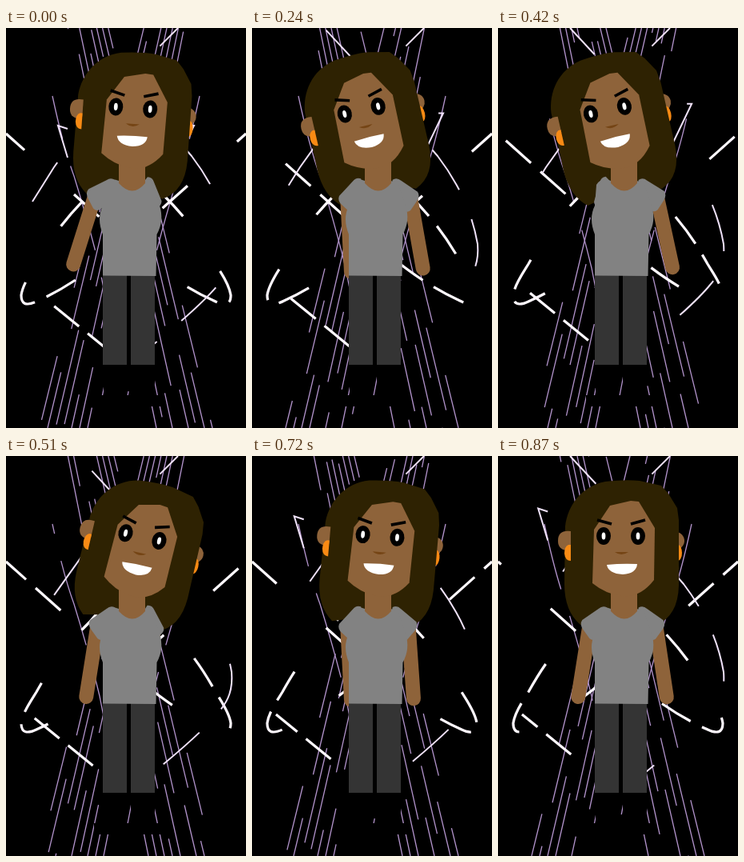
Write an HTML page that moves like this. It is 300 by 500 pixels and loops after 0.9 s.

```html
<!DOCTYPE html>
<html lang="en">
<head>
<meta charset="utf-8">
<title>Dancer</title>
<style>
html, body { margin: 0; width: 100%; height: 100%; overflow: hidden; background: #000; }
svg { display: block; width: 100vw; height: 100vh; }
.beam { fill: none; stroke: #fff8ff; stroke-width: 3.2; }
.thin { fill: none; stroke: #f0e2fa; stroke-width: 2; }
.ray { fill: none; stroke: #b394cc; stroke-width: 1.3; }
.skin { fill: #8e633a; }
.hair { fill: #2e2202; }
.shirt { fill: #828282; }
.gold { fill: #f88a14; }
.arm { stroke: #8e633a; stroke-width: 18; stroke-linecap: round; }
</style>
</head>
<body>
<svg viewBox="0 0 300 500" preserveAspectRatio="none">
  <defs>
    <path id="sleeve" class="shirt" d="M6-2Q0-4-4 2L-20 21Q-22 27-16 32L-5 41Q0 43 3 39L14 20Z"/>
    <path id="limb" class="arm" d="M-9 29L0 115"/>
    <g id="eye">
      <ellipse rx="9" ry="11"/>
      <ellipse rx="2.4" ry="4.6" fill="#fff"/>
    </g>
  </defs>
  <rect width="300" height="500"/>
  <g id="rays"></g>
  <g id="beams"></g>
  <path id="tipL" class="thin"/>
  <path id="tipR" class="thin"/>

  <g class="head">
    <circle class="skin" cx="222" cy="106" r="11"/>
    <ellipse class="gold" cx="225" cy="121" rx="5" ry="10"/>
    <path class="hair" d="M84 88C87 62 104 38 134 32Q160 29 177 31L204 37L213 47L224 65L226 80V162Q225 200 198 211L178 203H140L103 211Q83 194 83 160Z"/>
    <path class="skin" d="M91 94Q75 92 75 106Q75 117 86 118L91 115Z"/>
    <path class="gold" d="M91 111H88Q83 113 83 122Q84 131 91 131Z"/>
  </g>

  <g transform="translate(130 190)"><g id="armL"><use href="#limb"/><use href="#sleeve"/></g></g>
  <g transform="translate(182 190) scale(-1 1)"><g id="armR"><use href="#limb"/><use href="#sleeve"/></g></g>

  <path d="M122 420H151V459H122ZM156 420H186V459H156ZM110 459H198V473H110ZM150 308H157V421H150Z"/>
  <path fill="#343434" d="M121 308H151V421H121ZM156 308H186V421H156Z"/>
  <path class="shirt" d="M141 191Q129 186 123 196L121 222Q113 238 121 258V309.500L187.500 310L188.500 258Q198 241 192 222L182 193L173 191Z"/>
  <path class="skin" d="M141 150H174V194Q158 213 141 194Z"/>

  <g class="head">
    <path class="skin" d="M140 62L166 56L176 57L196 90L195 155Q177 178 154 175Q134 172 118 159L120 92Z"/>
    <use href="#eye" x="132" y="100"/>
    <use href="#eye" x="175" y="100"/>
    <path stroke="#000" stroke-width="3.600" d="M124 80L142 85M166 85L184 80"/>
    <path fill="#754515" d="M146 120H163Q154 126 146 120Z"/>
    <path fill="#fff" d="M136 136Q155 134 174 135Q173 147 156 148Q138 147 136 136Z"/>
  </g>
</svg>
<script>
const LOOP = 900, STEP = 30;
const $ = id => document.getElementById(id);
const heads = document.querySelectorAll('.head');

const times = [0, 90, 240, 360, 510, 720, 870];
const pose = {
  head: [4, 12, -13, -28, 13, 5, 0],
  armL: [23.5, 31, 3, -43, 15, 3, 15],
  armR: [-18, -25, 16, 36.5, -12, 10, 14.5]
};

// Smooth curve through the key poses
function at(v, t) {
  const n = times.length - 1;
  let i = 0;
  while (i < n - 1 && t >= times[i + 1]) i++;
  const slope = k => {
    const a = Math.max(k - 1, 0), b = Math.min(k + 1, n);
    return (v[b] - v[a]) / (times[b] - times[a]);
  };
  const d = times[i + 1] - times[i], u = (t - times[i]) / d, w = 1 - u;
  return v[i] * (1 + 2 * u) * w * w + v[i + 1] * u * u * (3 - 2 * u)
    + d * u * w * (slope(i) * w - slope(i + 1) * u);
}

const dashed = [];
function addPath(parent, cls, d, dash, start, speed, mirror) {
  const p = document.createElementNS('http://www.w3.org/2000/svg', 'path');
  p.setAttribute('class', cls);
  p.setAttribute('d', d);
  p.setAttribute('stroke-dasharray', dash);
  if (mirror) p.setAttribute('transform', 'translate(300 0) scale(-1 1)');
  $(parent).append(p);
  dashed.push({ p, start, speed });
}

const pair = '42 16 42 83';
const hook = 'M0 132L150 266C188 299 222 324 260 341C274 348 281 346 281 334'
  + 'C279 320 268 305 262 295C248 270 232 244 196 208L150 155';
const bow = 'M90 0L130 43L232 160Q245 177 255 195Q275 230 282 270'
  + 'C284 295 276 308 266 320Q246 345 185 395';
addPath('beams', 'beam', hook, pair, 114, -0.24);
addPath('beams', 'beam', hook, pair, 98, 0.078, true);
addPath('beams', 'thin', bow, '60 40 60 140', 96, 0.45);
addPath('beams', 'beam', 'M30 323L122 398', '40 14 40 80', 39, -0.062);
addPath('beams', 'thin', 'M33 217L60 174L95 125', '58 200', 0, 0.1);
addPath('beams', 'thin', 'M215 0L170 45', '32 60', 0, 0);

const waist = 'M58 85Q72 150 85 185Q105 250 117 300L150 470';
for (const mirror of [false, true])
  addPath('rays', 'ray', waist, '110 35', 90, 0.2, mirror);

let seed = 11;
const rnd = () => (seed = seed * 16807 % 2147483647) / 2147483647;
for (let i = 0; i < 9; i++) {
  const top = 135 - i * 7.2, bottom = 258 - i * 10;
  for (const mirror of [false, true]) {
    const on = 80 + rnd() * 50, off = 45 + rnd() * 50;
    addPath('rays', 'ray', `M${top} 0L${bottom} 500`, `${on} ${off}`,
      rnd() * 200, mirror ? 0.24 : -0.24, mirror);
  }
}

function draw(t) {
  for (const { p, start, speed } of dashed)
    p.setAttribute('stroke-dashoffset', -(start + speed * t));
  const turn = `rotate(${at(pose.head, t)} 157 175)`;
  heads.forEach(h => h.setAttribute('transform', turn));
  for (const id of ['armL', 'armR'])
    $(id).setAttribute('transform', `rotate(${at(pose[id], t)})`);

  const x = 65 - t * 0.017, y = 122 - t * 0.065;
  const left = t < 170 || t > 600, right = t < 430;
  $('tipL').setAttribute('d', left ? `M${x + 12} ${y + 4}L${x} ${y}l12 40` : '');
  $('tipR').setAttribute('d', right ? `M${294 - x} ${y}H${300 - x}l-25 52` : '');
}

const begin = performance.now();
function tick() {
  const t = (performance.now() - begin) % LOOP;
  draw(Math.floor(t / STEP) * STEP);
  requestAnimationFrame(tick);
}
tick();
</script>
</body>
</html>
```
